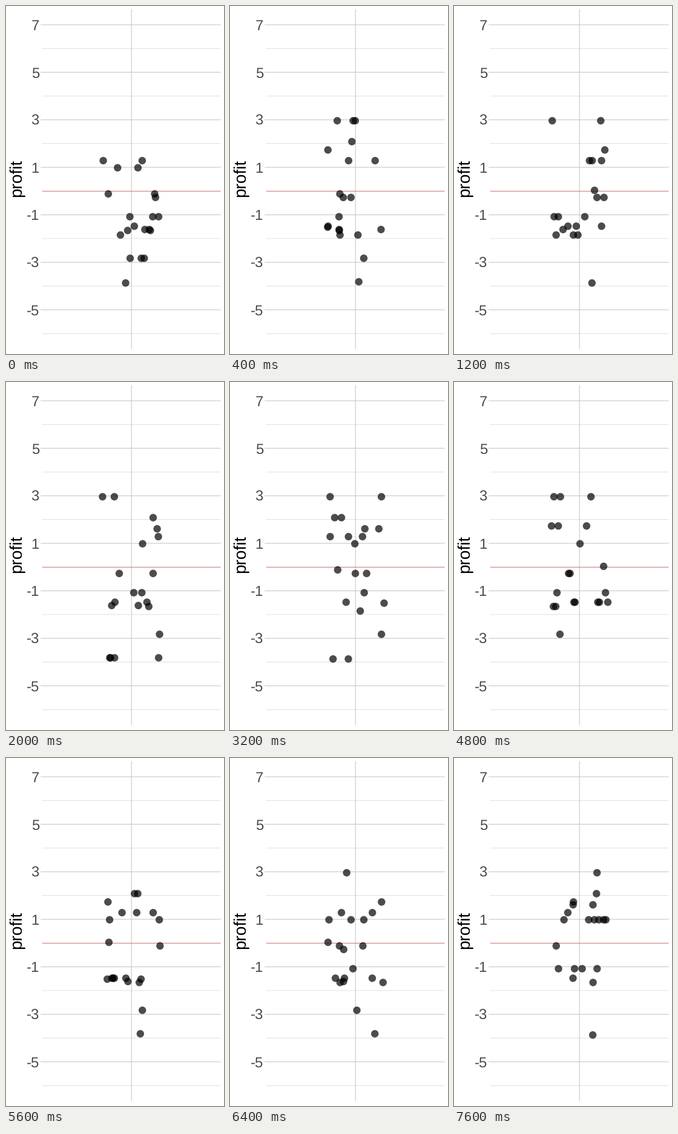
These frames come from a looping animation (360 px wide and 576 px high, 8 s). A matplotlib script:

```python
import random

import matplotlib.pyplot as plt
from matplotlib.animation import FuncAnimation
from matplotlib.patches import Circle

W, H, DPI = 360, 576, 100
LEFT, RIGHT, TOP, BOTTOM = 60, 354.5, 5.5, 567.75
LOW, HIGH = -6, 7                   # axis limits before padding
PAD = 0.05 * (HIGH - LOW)
UNIT = (BOTTOM - TOP) / (HIGH - LOW + 2 * PAD)
MID, SPREAD = (LEFT + RIGHT) / 2, 48
TICK = 2.75
THICK, THIN = 1.07, 0.53            # line weights in pixels
ROUNDS, SAMPLE, RADIUS = 20, 20, 6.2
GRID, LABEL = "#c6c6c6", "#4d4d4d"

# Profits to draw from; repeated values come up more often.
POOL = [2.96, 2.96, 2.08, 1.73, 1.61, 1.28, 0.98, 0.98, 0.03, -0.12, -0.27,
        -1.08, -1.08, -1.08, -1.48, -1.48, -1.52, -1.62, -1.66, -1.85,
        -2.83, -3.82, -3.87]

plt.rcParams.update({"font.family": "Liberation Sans",
                     "text.hinting": "no_hinting"})


def px(pixels):
    """Pixels to typographic points."""
    return pixels * 72 / DPI


def row(profit):
    return TOP + (HIGH + PAD - profit) * UNIT


def resample(seed):
    """Bootstrap sample of the profits with sideways jitter."""
    rng = random.Random(seed)
    return [(MID + rng.uniform(-SPREAD, SPREAD), row(profit))
            for profit in rng.choices(POOL, k=SAMPLE)]


fig = plt.figure(figsize=(W / DPI, H / DPI), dpi=DPI, facecolor="white")
ax = fig.add_axes([0, 0, 1, 1])
ax.set(xlim=(0, W), ylim=(H, 0))
ax.axis("off")


def line(xs, ys, color, width):
    ax.plot(xs, ys, color=color, lw=px(width), solid_capstyle="butt",
            snap=False)


for value in range(LOW, HIGH + 1):
    y = row(value)
    major = value % 2 == 1
    start = LEFT - TICK if major else LEFT
    line([start, RIGHT], [y, y], GRID, THICK if major else THIN)
    if major:
        ax.text(54.9, y + 8.6, str(value), size=px(24), color=LABEL,
                ha="right", va="baseline")
line([MID, MID], [TOP, BOTTOM], GRID, THICK)
line([LEFT, RIGHT], [row(0), row(0)], "red", THIN)
ax.text(25.6, 285.3, "profit", size=px(28), color="black", rotation=90,
        rotation_mode="anchor", ha="center", va="baseline")

dots = [ax.add_patch(Circle((0, 0), RADIUS, fc="black", lw=0, alpha=0.7,
                            zorder=3)) for _ in range(SAMPLE)]


def draw(n):
    for dot, spot in zip(dots, resample(n)):
        dot.set_center(spot)
    return dots


anim = FuncAnimation(fig, draw, frames=ROUNDS, interval=400, repeat=True)
plt.show()
```
